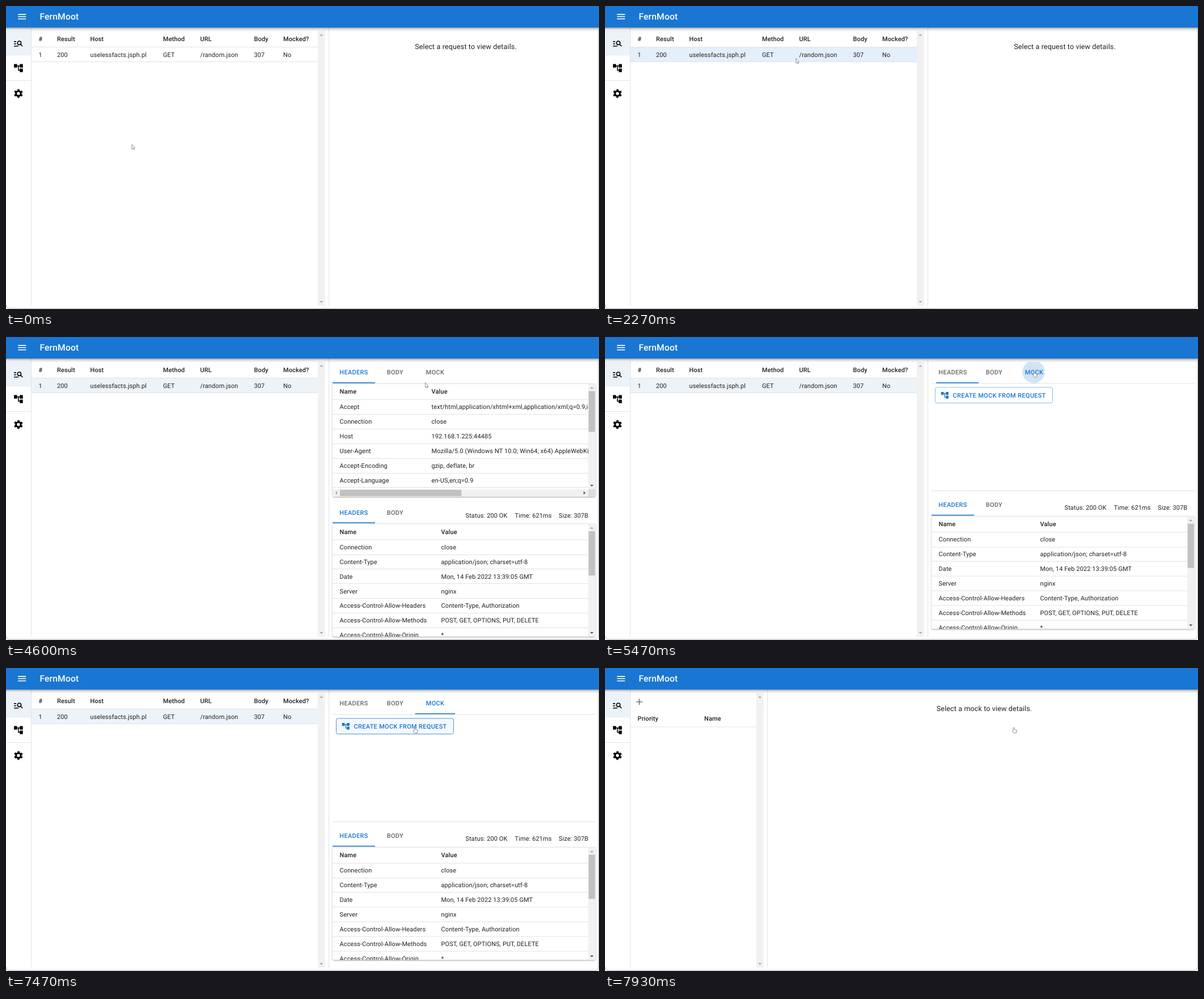
Animation, 1046 px wide and 535 px high, one loop 8 s. Source, as an HTML page:

```html
<!DOCTYPE html>
<html lang="en">
<head>
<meta charset="utf-8">
<title>Request inspector</title>
<style>
html, body { margin: 0; width: 100%; height: 100%; overflow: hidden; background: #fff; }
#stage { display: block; width: 1046px; height: 535px; }
text { font: 400 10.98px Roboto, Arial, sans-serif; letter-spacing: .0107em; fill: #212121; text-rendering: geometricPrecision; white-space: pre; }
.head { font-weight: 500; }
.tab { font-weight: 500; letter-spacing: .0286em; fill: #666; }
.on { fill: #1976d2; }
.mid { text-anchor: middle; }
.big { font-size: 12.55px; letter-spacing: .0094em; }
.title { font-size: 15.7px; font-weight: 500; letter-spacing: .0075em; fill: #fff; }
.line { stroke: #e2e2e2; fill: none; }
.paper { fill: #fff; filter: drop-shadow(0 1px 1px rgba(0, 0, 0, .38)); }

/* Paused animations, positioned by --t (ms) */
.anim { animation: 8s step-end paused; animation-delay: calc(var(--t, 0) * -1ms); }
.list { animation-name: list; }
.empty { animation-name: empty; }
.details { animation-name: details; }
.before { animation-name: before; }
.after { animation-name: after; }
.mocks { animation-name: mocks; }
.row { animation-name: row; }
.lower { animation-name: lower; }
.button { animation-name: button; }
.arrow { animation-name: arrow; }
.hand { animation-name: hand; }
.cursor { animation-name: cursor; animation-timing-function: linear; }
.slider { animation-name: slider; animation-timing-function: cubic-bezier(.4, 0, .2, 1); }
.ripple { fill: #1976d2; transform-box: fill-box; transform-origin: center; }
.tabRipple { animation-name: tabGrow, tabFade; animation-timing-function: cubic-bezier(.4, 0, .2, 1), linear; }
.btnRipple { animation-name: btnGrow, btnFade; animation-timing-function: cubic-bezier(.4, 0, .2, 1), linear; }

@keyframes list { 0% { opacity: 1 } 99.1%, 100% { opacity: 0 } }
@keyframes mocks { 0% { opacity: 0 } 99.1%, 100% { opacity: 1 } }
@keyframes empty { 0% { opacity: 1 } 32.4%, 100% { opacity: 0 } }
@keyframes details { 0% { opacity: 0 } 32.4% { opacity: 1 } 99.1%, 100% { opacity: 0 } }
@keyframes before { 0% { opacity: 1 } 67.4%, 100% { opacity: 0 } }
@keyframes after { 0% { opacity: 0 } 67.4%, 100% { opacity: 1 } }
@keyframes lower { 0% { transform: none } 67.4%, 100% { transform: translateY(-13.4px) } }
@keyframes row { 0% { fill: #fff } 28.3% { fill: #e3effb } 49.1%, 100% { fill: #ecf3f9 } }
@keyframes button {
  0% { fill: #fff; stroke: #8cbae8 }
  78.2%, 100% { fill: #f5f9fd; stroke: #4a92dc }
}
@keyframes arrow { 0% { opacity: 1 } 58.3%, 100% { opacity: 0 } }
@keyframes hand { 0% { opacity: 0 } 58.3%, 100% { opacity: 1 } }
@keyframes slider {
  0%, 67.8% { x: 576px; width: 75px }
  71.6%, 100% { x: 721.6px; width: 70.4px }
}
@keyframes tabGrow { 0%, 66% { transform: scale(0) } 72.9%, 100% { transform: scale(1) } }
@keyframes tabFade { 0%, 66% { opacity: .1 } 68.4%, 70% { opacity: .2 } 77.4%, 100% { opacity: 0 } }
@keyframes btnGrow { 0%, 93% { transform: scale(0) } 99.9%, 100% { transform: scale(1) } }
@keyframes btnFade { 0%, 93% { opacity: .1 } 95.5% { opacity: .2 } 100% { opacity: .08 } }
@keyframes cursor {
  0%, 4.95% { transform: translate(221.5px, 244px) }
  4.99%, 8.4% { transform: translate(179px, 227px) }
  10% { transform: translate(158px, 222px) }
  14.16% { transform: translate(300px, 127px) }
  16.6% { transform: translate(340px, 83px) }
  18.3%, 19.9% { transform: translate(333px, 93px) }
  19.99%, 47.6% { transform: translate(336.5px, 92px) }
  50.8% { transform: translate(400px, 122px) }
  54.2% { transform: translate(590px, 125px) }
  57.5% { transform: translate(739px, 80px) }
  58.3% { transform: translate(744px, 70px) }
  60.8%, 70% { transform: translate(753.5px, 60px) }
  78.3%, 100% { transform: translate(717.5px, 104px) }
}
</style>
</head>
<body>
<svg id="stage" viewBox="0 0 1046 535">
  <defs>
    <linearGradient id="shade" x2="0" y2="1">
      <stop stop-opacity=".36"/>
      <stop offset=".45" stop-opacity=".12"/>
      <stop offset="1" stop-opacity="0"/>
    </linearGradient>
    <clipPath id="tabClip"><rect x="721.6" y="44" width="70.5" height="37.6"/></clipPath>
    <clipPath id="btnClip"><rect x="582" y="88.5" width="208" height="28.5" rx="3"/></clipPath>
    <path id="tree" d="M22 11V3h-7v3H9V3H2v8h7V8h2v10h4v3h7v-8h-7v3h-2V8h2v3z"/>
  </defs>
  <rect width="1046" height="535" fill="#fff"/>
  <g id="body"></g>

  <g id="sidebar">
    <rect y="44" width="44" height="43.5" fill="#ebf3f9"/>
    <path class="line" d="M44.5 38V529M0 131.5H44"/>
    <g transform="translate(12.5 56.6) scale(.784)">
      <path d="M2 7h5v2H2zM2 12h5v2H2zM2 17h10v2H2z"/>
      <g fill="none" stroke="#000" stroke-width="2"><circle cx="14" cy="11" r="4"/><path d="M16.8 13.8l4.5 4.5"/></g>
    </g>
    <use href="#tree" transform="translate(12.5 100.2) scale(.784)"/>
    <g transform="translate(12.5 145.1) scale(.784)" fill="none" stroke="#000">
      <circle cx="12" cy="12" r="5.5" stroke-width="4"/>
      <circle cx="12" cy="12" r="8.5" stroke-width="3" stroke-dasharray="4.4 4.5" stroke-dashoffset="-2.25"/>
    </g>
  </g>

  <rect y="38" width="1046" height="7" fill="url(#shade)"/>
  <rect width="1046" height="38" fill="#1976d2"/>
  <path d="M21.2 14.9h14.1M21.2 18.8h14.1M21.2 22.7h14.1" stroke="#fff" stroke-width="1.57"/>
  <text class="title" x="59.5" y="18.5" dy=".355em">FernMoot</text>
  <path d="M.5 528q0 6 6 6H1039q6 0 6-6V38" fill="none" stroke="#b0b0b0"/>

  <g class="anim cursor" fill="#fff" stroke="#777" stroke-width=".8" stroke-linejoin="round">
    <path class="anim arrow" d="M.5 .5V9L2.4 7.3L3.7 10L5 9.4L3.8 6.8H6z"/>
    <path class="anim hand" d="M2.6 6.8V1.3Q3.4 .1 4.2 1.3V4.2L7.4 4.9Q8.5 5.2 8.4 6.4L7.6 10.8H3.6L.6 7.4Q.8 6 2.6 7.4z"/>
  </g>
</svg>

<script>
const text = (x, y, s, cls = '') => `<text class="${cls}" x="${x}" y="${y}" dy=".355em">${s}</text>`;
const hline = (x, y, end) => `<path class="line" d="M${x} ${y}H${end}"/>`;
const vline = x => `<path class="line" d="M${x} 38V529"/>`;
const rect = (x, y, w, h, fill) => `<rect x="${x}" y="${y}" width="${w}" height="${h}" fill="${fill}"/>`;
const group = (cls, ...parts) => `<g class="anim ${cls}">${parts.join('')}</g>`;
const clipBox = (x, y, w, h, s) =>
  `<svg x="${x}" y="${y}" width="${w}" height="${h}" viewBox="${x} ${y} ${w} ${h}">${s}</svg>`;
const cells = (xs, y, words, cls) => words.map((s, i) => text(xs[i], y, s, cls)).join('');

// Scroll arrow, turned clockwise from pointing up
const tip = (x, y, turn, fill = '#a3a3a3') =>
  `<path fill="${fill}" transform="translate(${x} ${y}) rotate(${turn})" d="M-3 1.6L0-1.6L3 1.6z"/>`;

const scrollbar = (x, top, bottom, thumb = 0) =>
  rect(x, top, 12.7, bottom - top, '#f1f1f1') +
  (thumb ? rect(x + .7, top + 13, 11.3, thumb, '#c1c1c1') : '') +
  tip(x + 6.3, top + 7, 0) +
  tip(x + 6.3, bottom - 6.5, 180, thumb ? '#505050' : '#a3a3a3');

function headerTable(top, height, valueX, rows) {
  const xs = [588.5, valueX];
  let s = cells(xs, top + 14.5, ['Name', 'Value'], 'head') + hline(576, top + 28.5, 1027);
  rows.forEach((pair, i) => {
    const y = top + 41.5 + i * 25.88;
    s += cells(xs, y, pair) + hline(576, Math.round(y + 12.5) + .5, 1027);
  });
  return `<rect class="paper" x="576" y="${top}" width="464" height="${height}" rx="3"/>` +
    hline(576, top + .5, 1040) + clipBox(576, top, 451, height, s);
}

const tabs = (y, names, active) => names.map((s, i) =>
  text([613.5, 686.4, 757][i], y, s, 'tab mid' + (i === active ? ' on' : ''))).join('');

const requestRows = [
  ['Accept', 'text/html,application/xhtml+xml,application/xml;q=0.9,image/avif'],
  ['Connection', 'close'],
  ['Host', '192.168.1.225:44485'],
  ['User-Agent', 'Mozilla/5.0 (Windows NT 10.0; Win64; x64) AppleWebKit/537.36'],
  ['Accept-Encoding', 'gzip, deflate, br'],
  ['Accept-Language', 'en-US,en;q=0.9']
];
const responseRows = [
  ['Connection', 'close'],
  ['Content-Type', 'application/json; charset=utf-8'],
  ['Date', 'Mon, 14 Feb 2022 13:39:05 GMT'],
  ['Server', 'nginx'],
  ['Access-Control-Allow-Headers', 'Content-Type, Authorization'],
  ['Access-Control-Allow-Methods', 'POST, GET, OPTIONS, PUT, DELETE'],
  ['Access-Control-Allow-Origin', '*']
];
const tabNames = ['HEADERS', 'BODY', 'MOCK'];
const columns = [57.5, 90, 148.5, 277, 342.5, 437.5, 489];

const list = group('list',
  '<rect class="anim row" x="45" y="73" width="505" height="25.5"/>',
  cells(columns, 58, ['#', 'Result', 'Host', 'Method', 'URL', 'Body', 'Mocked?'], 'head'),
  cells(columns, 85.8, ['1', '200', 'uselessfacts.jsph.pl', 'GET', '/random.json', '307', 'No']),
  hline(45, 72.5, 550), hline(45, 98.5, 550),
  scrollbar(550, 44, 529), vline(569.5));

const empty = group('empty', text(811, 72, 'Select a request to view details.', 'big mid'));

const requestHeaders = group('before',
  tabs(62.5, tabNames, 0),
  headerTable(82, 200, 750.5, requestRows),
  rect(576, 269, 451, 12.7, '#f1f1f1'), rect(589, 269.7, 214.5, 11.3, '#c1c1c1'),
  tip(582.5, 275.3, -90), tip(1020.5, 275.3, 90, '#505050'),
  rect(1027, 269, 12.7, 12.7, '#dcdcdc'),
  scrollbar(1027, 82.5, 269, 72),
  rect(576, 80, 75, 1.6, '#1976d2'));

const mockTab = group('after',
  hline(576, 82, 1040), hline(576, 271.5, 1040),
  tabs(62.5, tabNames, 2),
  '<g clip-path="url(#tabClip)"><circle class="anim ripple tabRipple" cx="756" cy="61.5" r="42"/></g>',
  '<rect class="anim slider" y="80" height="1.6" fill="#1976d2"/>',
  '<rect class="anim button" x="582.5" y="89" width="207" height="27.5" rx="3"/>',
  '<use href="#tree" class="on" transform="translate(591.5 95) scale(.654)"/>',
  text(613.5, 102.8, 'CREATE MOCK FROM REQUEST', 'tab on'),
  '<g clip-path="url(#btnClip)"><circle class="anim ripple btnRipple" cx="721" cy="104" r="140"/></g>');

const response = group('lower',
  tabs(310, tabNames.slice(0, 2), 0),
  text(810.5, 314.8, 'Status: 200 OK'), text(897.5, 314.8, 'Time: 621ms'), text(975, 314.8, 'Size: 307B'),
  headerTable(329.5, 199.5, 767.5, responseRows),
  scrollbar(1027, 330, 529, 78),
  rect(576, 327.2, 75, 1.6, '#1976d2'));

const mocks = group('mocks',
  '<path d="M60.5 54.2V65.2M55 59.7H66" stroke="#757575" stroke-width="1.6"/>',
  cells([57.5, 175], 89.5, ['Priority', 'Name'], 'head'),
  hline(45, 104, 267), scrollbar(267, 44, 529), vline(286.5),
  text(669, 72, 'Select a mock to view details.', 'big mid'));

document.getElementById('body').innerHTML =
  list + empty + group('details', requestHeaders, mockTab, response) + mocks;

const start = performance.now();
function tick() {
  const t = (performance.now() - start) % 8000;
  const step = Math.min(119, Math.floor((t + 4) * .015));
  document.documentElement.style.setProperty('--t', (step * 1000 / 15).toFixed(2));
  requestAnimationFrame(tick);
}
tick();
</script>
</body>
</html>
```
